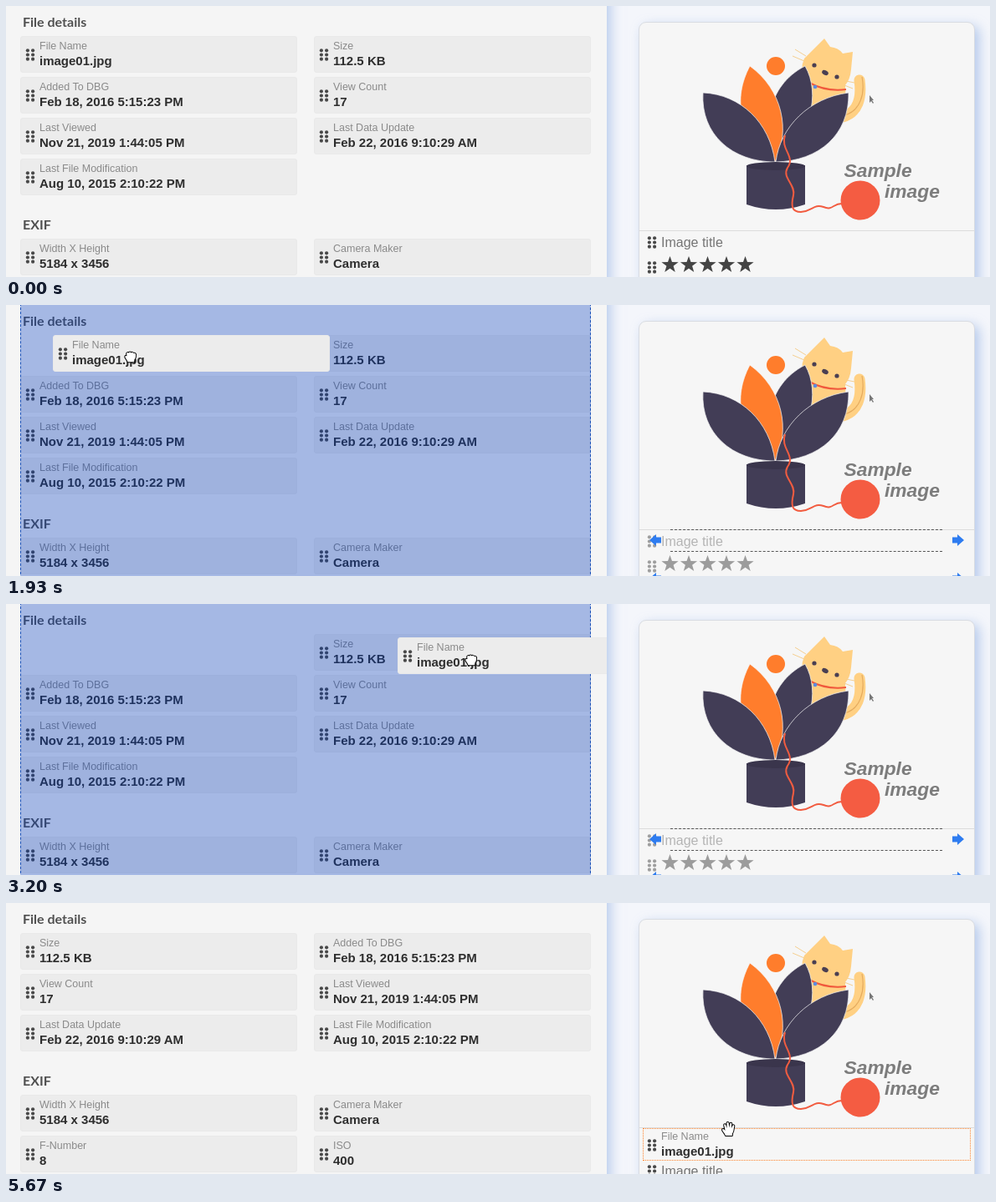
Animation, 1176 px wide and 325 px high, one loop 6740 ms. Source, as an HTML page:

```html
<!DOCTYPE html>
<html lang="en">
<head>
<meta charset="utf-8">
<title>Drag a field onto the image card</title>
<style>
html, body { margin: 0; width: 100%; height: 100%; overflow: hidden; }
#stage { position: relative; width: 1176px; height: 325px; overflow: hidden; background: #f4f6fb;
  font-family: "Liberation Sans", Arial, sans-serif; }
#stage div, #stage svg { position: absolute; box-sizing: border-box; }
#panel { left: 0; top: -30px; width: 718px; height: 385px; background: #f5f5f5;
  box-shadow: 4px 0 14px rgba(140, 172, 226, .62); }
#left { left: 0; top: 0; width: 718px; height: 325px; overflow: hidden; }
.head { left: 20px; font: bold 16px/20px Lato, sans-serif; color: #505050; white-space: nowrap; }
.field { width: 331px; height: 44px; border-radius: 3px; background: #ececec; border: 1px solid #e9e9e9; }
.label, .value, .title { white-space: nowrap; }
.label { left: 22px; top: 3px; font-size: 12.5px; line-height: 16px; color: #8a8a8a; }
.value { left: 22px; top: 20px; font-size: 15px; line-height: 18px; font-weight: bold; color: #2e2e2e; }
.dots { left: 5px; top: 14px; width: 12px; height: 15px; fill: #484848; }
#zone { left: 17px; top: -2px; width: 682px; height: 330px; border: 1px dashed #1950b8; }
#zone.over { background: rgba(0, 60, 190, .33); }
#card { left: 756px; top: 19px; width: 402px; height: 330px; border-radius: 9px; background: #f6f6f6;
  border: 1px solid #d9dce2; box-shadow: 5px 5px 14px rgba(140, 172, 226, .62); }
#rule { left: 757px; top: 269px; width: 400px; height: 1px; background: #dcdcdc; }
#rows { left: 0; top: 0; width: 1176px; height: 370px; }
#rows .dots { left: 766px; }
.title { left: 783px; top: 274px; font-size: 16px; line-height: 19px; color: #757575; }
#dropped { left: 761px; top: 270px; width: 392px; height: 39px; }
#dropped .dots { left: 5px; top: 13px; }
#dropped .label { top: 2px; }
#dropped .value { top: 19px; }
#dropped.lit { outline: 1px dotted #ff852e; outline-offset: -1px; }
#slot { left: 794px; top: 269px; width: 325px; height: 27px; border: dashed #555; border-width: 1px 0; }
#bar { left: 794px; top: 275px; width: 325px; height: 14px; background: rgba(0, 60, 190, .33); }
#stage .hide { display: none; }
</style>
</head>
<body>
<div id="stage">
  <div id="panel"></div>
  <div id="left">
    <div id="fields"></div>
    <div id="zone"></div>
    <div id="moving"></div>
  </div>
  <div id="card"></div>
  <svg width="1176" height="270" viewBox="0 0 1176 270">
    <circle cx="920" cy="72" r="11" fill="#ff7d2c"/>
    <g fill="#ffd083">
      <path d="M978 39 L985 49 Q995 50 1000 57 L1012 55 L1010 76 Q1009 88 1003 95 L1004 120 L948 125 L956 90 Q948 76 954 63 Z"/>
      <path d="M1020 89 C1023 110 1018 128 1000 133" fill="none" stroke="#ffd083" stroke-width="13" stroke-linecap="round"/>
      <path d="M1023 85 C1027 105 1021 126 1002 131" fill="none" stroke="#e5ab5e" stroke-width="1.2"/>
    </g>
    <g fill="none" stroke="#f5cf90" stroke-width="1">
      <path d="M943 52 L956 60 M940 60 L954 66 M1004 90 L1014 92 M1002 95 L1012 99"/>
      <path d="M960 92 Q980 103 1004 100" stroke="#f0583c" stroke-width="2"/>
    </g>
    <g fill="#4a3f52">
      <circle cx="966" cy="71" r="2.6"/><circle cx="993" cy="85" r="2.6"/>
      <ellipse cx="979" cy="80" rx="4" ry="2.7" transform="rotate(25 979 80)"/>
    </g>
    <circle cx="967" cy="97" r="2.3" fill="#5c8ce0"/>
    <g fill="#423d56" stroke="#f6f6f6" stroke-width=".7">
      <path d="M955 72 C908 96 904 150 920 187 C962 158 974 105 955 72 Z"/>
      <path d="M889 72 C868 112 876 152 919 187 C938 150 928 100 889 72 Z" fill="#ff7d2c"/>
      <path d="M833 104 C878 106 913 140 919 187 C868 187 830 154 833 104 Z"/>
      <path d="M1007 104 C960 110 925 145 920 187 C972 186 1008 154 1007 104 Z"/>
    </g>
    <path d="M885 191 V238 Q920 250 955 238 V191 Z" fill="#423d56"/>
    <ellipse cx="920" cy="192" rx="35" ry="5" fill="#3a354c"/>
    <path d="M931 155 C925 172 944 180 934 194 C927 206 944 214 941 227 C938 240 939 247 950 247 C964 246 965 237 977 241 C989 246 988 236 1000 237"
      fill="none" stroke="#f25c40" stroke-width="2"/>
    <circle cx="1021" cy="233" r="23.5" fill="#f45c42"/>
    <path d="M1032 107 v9 l2 -2 l2 3 l1 -1 l-2 -3 h2 Z" fill="#777"/>
    <g font-family="'Liberation Sans', Arial, sans-serif" font-size="22.8" font-weight="bold" font-style="italic" fill="#7c7c7c">
      <text x="1001.5" y="204.5">Sample</text><text x="1050" y="230">image</text>
    </g>
  </svg>
  <div id="rule"></div>
  <div id="rows"><div class="title">Image title</div></div>
  <div id="dropped"></div>
  <div id="target">
    <div id="slot"></div>
    <div id="bar"></div>
    <svg width="1176" height="325" fill="#2e7cf0">
      <defs><path id="arrow" d="M0 0 L8 -7 V-3.5 H14 V3.5 H8 V7 Z"/></defs>
      <use href="#arrow" x="769" y="282"/><use href="#arrow" x="769" y="328"/>
      <use href="#arrow" transform="translate(1145 282) scale(-1 1)"/>
      <use href="#arrow" transform="translate(1145 328) scale(-1 1)"/>
    </svg>
  </div>
  <svg id="cursor" width="1176" height="325">
    <path id="glyph" stroke-linejoin="round" paint-order="stroke"/>
  </svg>
</div>
<script>
const $ = id => document.getElementById(id);
const show = (el, on) => el.classList.toggle('hide', !on);
const LOOP = 6740, STEP = 1000 / 15;

const fileFields = [
  ['File Name', 'image01.jpg'], ['Size', '112.5 KB'],
  ['Added To DBG', 'Feb 18, 2016 5:15:23 PM'], ['View Count', '17'],
  ['Last Viewed', 'Nov 21, 2019 1:44:05 PM'], ['Last Data Update', 'Feb 22, 2016 9:10:29 AM'],
  ['Last File Modification', 'Aug 10, 2015 2:10:22 PM']
];
const exifFields = [
  ['Width X Height', '5184 x 3456'], ['Camera Maker', 'Camera'],
  ['F-Number', '8'], ['ISO', '400']
];

function dots(top) {
  let s = '';
  for (let i = 0; i < 6; i++)
    s += `<circle cx="${2.9 + i % 2 * 6.2}" cy="${2.3 + (i >> 1) * 5.2}" r="2.1"/>`;
  return `<svg class="dots"${top ? ` style="top:${top}px"` : ''}>${s}</svg>`;
}

const content = ([label, value]) =>
  `${dots()}<div class="label">${label}</div><div class="value">${value}</div>`;

function group(title, list, top) {
  const cells = list.map((f, i) =>
    `<div class="field" style="left:${17 + i % 2 * 351}px;top:${top + 27 + (i >> 1) * 49}px">${content(f)}</div>`);
  return `<div class="head" style="top:${top}px">${title}</div>` + cells.join('');
}

function layout(list) {
  const exifTop = 9 + Math.ceil(list.length / 2) * 49 + 47;
  $('fields').innerHTML = group('File details', list, 9) + group('EXIF', exifFields, exifTop);
}

function star(cx, cy) {
  const pts = [];
  for (let i = 0; i < 10; i++) {
    const r = i % 2 ? 4.3 : 10.6, a = i * Math.PI / 5;
    pts.push((cx + r * Math.sin(a)).toFixed(1) + ',' + (cy - r * Math.cos(a)).toFixed(1));
  }
  return `<polygon points="${pts.join(' ')}"/>`;
}

$('rows').innerHTML += dots(276) + dots(306) + '<svg width="1176" height="370" fill="#444">' +
  [0, 1, 2, 3, 4].map(i => star(793.5 + i * 22.5, 310.5)).join('') + '</svg>';
$('moving').className = 'field';
$('moving').innerHTML = $('dropped').innerHTML = content(fileFields[0]);

// Keys are [step, x, y] at 15 steps per second.
const pointerKeys = [
  [6, 19, 32], [15, 76, 60], [24, 76, 60], [27, 114, 60], [35, 254, 60], [36, 282, 60],
  [46, 531, 63], [48, 556, 65], [54, 726, 84], [57, 776, 98], [62, 833, 142],
  [68, 865, 188], [69, 865, 192], [77, 864, 280], [84, 864, 280], [85, 863.5, 271]
];
const itemKeys = [
  [28, 38, 36], [35, 164, 36], [36, 192, 36], [46, 442, 38], [48, 468, 40],
  [54, 647, 55], [57, 697, 69], [60, 740, 95]
];

function at(keys, k) {
  const i = keys.findIndex(p => p[0] > k);
  if (i < 0) return keys[keys.length - 1].slice(1);
  if (!i) return keys[0].slice(1);
  const a = keys[i - 1], b = keys[i], u = (k - a[0]) / (b[0] - a[0]);
  return [a[1] + (b[1] - a[1]) * u, a[2] + (b[2] - a[2]) * u];
}

const glyphs = {
  open: 'M5 17C4 14 1 11.5 1 10C1 8.8 2.6 8.6 3.6 10L4.6 11L3.2 4.5C3 3 4.8 2.7 5.2 4.2L6.5 8V2.2C6.5 .6 8.6 .6 8.7 2.2L9.2 7.6L10.3 2.6C10.6 1.2 12.5 1.5 12.3 3L11.8 8.2L13.4 4.9C14 3.7 15.6 4.3 15.3 5.6C14.6 9 14.8 12 13 14.5L12.8 17Z',
  closed: 'M5.5 17.3C5 15 2.5 13 2.3 11.3C2.2 10 3.5 9.6 4.5 10.2L4.2 7.8C4 6 6.2 5.4 6.8 6.8C7 5.3 9.2 5.2 9.6 6.6C10.2 5.4 12 5.7 12.3 7.1C13.2 6.4 15 6.8 15.1 8.4C15.3 11 14.5 13 13.4 14.6L13.1 17.3Z',
  move: 'M9 -.5L12.5 3.5H10V8H14.5V5.5L18.5 9L14.5 12.5V10H10V14.5H12.5L9 18.5L5.5 14.5H8V10H3.5V12.5L-.5 9L3.5 5.5V8H8V3.5H5.5Z'
};

function drawPointer(k, x, y) {
  const kind = k >= 85 || k < 20 ? 'open' : x > 718 ? 'move' : 'closed';
  const arrows = kind === 'move', g = $('glyph');
  show($('cursor'), k >= 6);
  g.setAttribute('d', glyphs[kind]);
  g.setAttribute('fill', arrows ? '#000' : '#fff');
  g.setAttribute('stroke', arrows ? '#fff' : '#000');
  g.setAttribute('stroke-width', arrows ? 1.6 : 2);
  g.setAttribute('transform', `translate(${Math.round(x) - 9} ${Math.round(y) - 9})`);
}

let wasDone;
function render(k) {
  const [x, y] = at(pointerKeys, k), [ix, iy] = at(itemKeys, k);
  const drag = k >= 28 && k < 84, done = k >= 84;
  if (done !== wasDone) {
    layout(done ? fileFields.slice(1) : fileFields);
    wasDone = done;
  }
  if (!done) $('fields').querySelector('.field').style.visibility = drag ? 'hidden' : 'visible';
  show($('zone'), drag);
  $('zone').classList.toggle('over', x < 700);
  show($('moving'), drag);
  $('moving').style.left = Math.round(ix) + 'px';
  $('moving').style.top = Math.round(iy) + 'px';
  $('moving').style.background = x < 700 ? '#ececec' : '#f1f1f1';
  show($('target'), drag);
  show($('bar'), y >= 269);
  $('rows').style.opacity = drag ? .5 : 1;
  $('rows').style.top = done ? '38px' : 0;
  show($('dropped'), done);
  $('dropped').classList.toggle('lit', k >= 85);
  drawPointer(k, x, y);
}

let start;
function tick(now) {
  start ??= now;
  render(Math.floor(((now - start) % LOOP + 4) / STEP));
  requestAnimationFrame(tick);
}
render(0);
requestAnimationFrame(tick);
</script>
</body>
</html>
```
